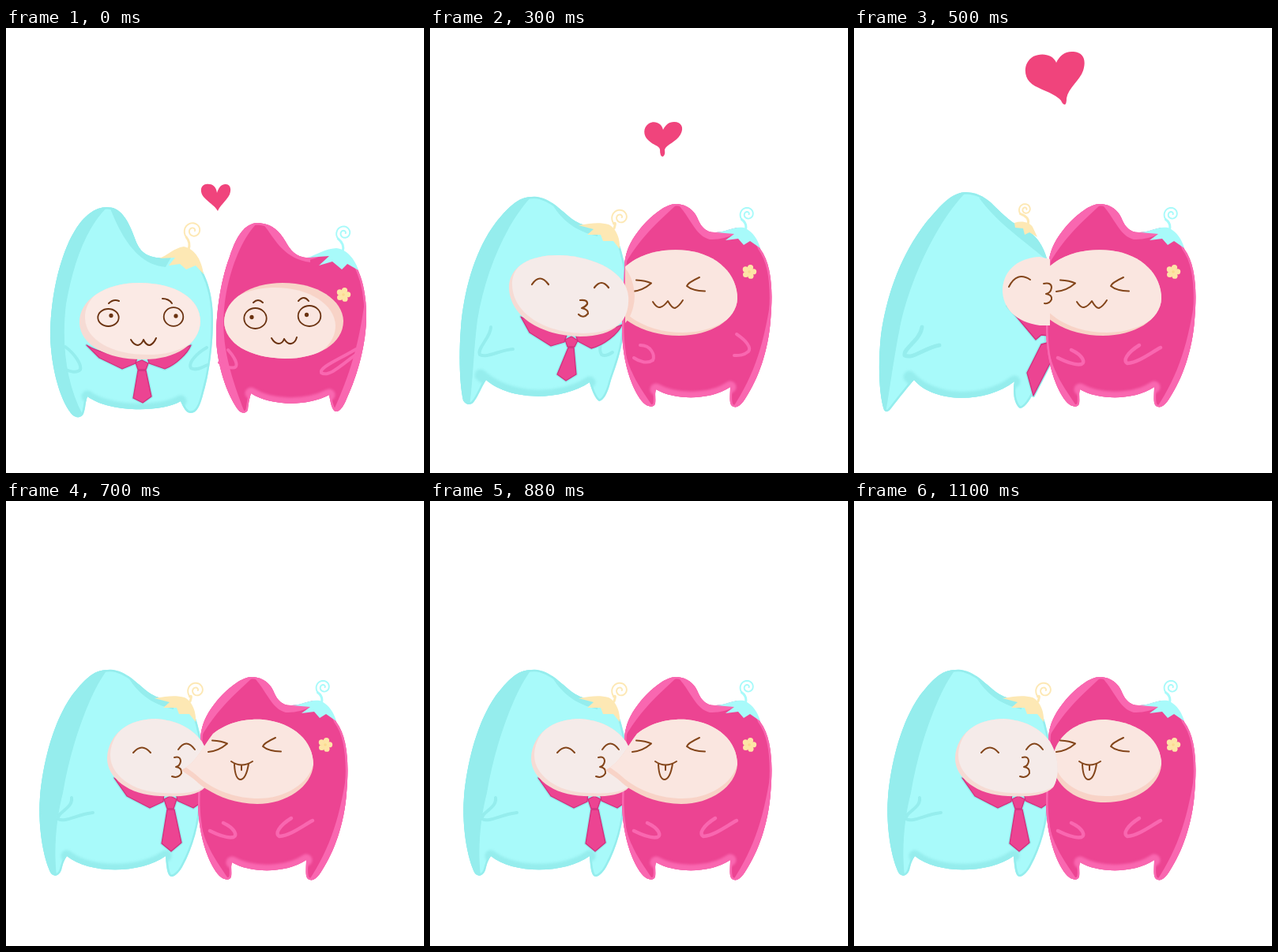
Animation of 529x564 px, one loop 1200 ms. Source, as an HTML page:

```html
<!DOCTYPE html>
<html lang="en">
<head>
<meta charset="utf-8">
<title>Bean kiss</title>
<style>
html, body { margin: 0; width: 100%; height: 100%; overflow: hidden; background: #fff; }
svg { display: block; width: 529px; height: 564px; }
.soft { filter: blur(1.5px); }
</style>
</head>
<body>
<svg id="stage" viewBox="0 0 529 564" fill="none" stroke-linecap="round" stroke-linejoin="round"></svg>
<script>
const AQUA = '#a8fafa', AQUA_DIM = '#95eded', PINK = '#ec4492', PINK_LIT = '#f967b0', PINK_DIM = '#d32e7e';
const CREAM = '#fde8b4', SKIN = '#fae6e0', SKIN_PALE = '#f5ebe9', BLUSH = '#f8d3c7', BLUSH_PALE = '#f6dbd4';
const HEART = '#f0447c', DARK = '#6a3210', BROWN = '#83451a';
const ENDS = [300, 500, 700, 1000, 1100, 1200];

const fill = (d, color) => `<path d="${d}" fill="${color}"/>`;
const line = (d, color, width = 2) => `<path d="${d}" stroke="${color}" stroke-width="${width}"/>`;
const oval = (x, y, rx, ry, color) => `<ellipse cx="${x}" cy="${y}" rx="${rx}" ry="${ry}" fill="${color}"/>`;
const shift = (x, y, art) => `<g transform="translate(${x} ${y})">${art}</g>`;

let clips = 0;
function clipped(d, color, inner) {
  const id = 'clip' + clips++;
  return `<clipPath id="${id}"><path d="${d}"/></clipPath>${fill(d, color)}<g clip-path="url(#${id})">${inner}</g>`;
}

// Side bands, a thin rim all round and a soft wide rim along the belly.
const body = (d, color, edge, bands, belly) =>
  clipped(d, color, fill(bands, edge) + line(d, edge, 5) + `<g class="soft">${line(belly, edge, 15)}</g>`);

// A face is its blush colour with the lit part laid over it, offset.
const face = (d, color, blush, dx, dy) => clipped(d, blush, shift(dx, dy, fill(d, color)));

function curl(x, y, r, stemX, stemY, color) {
  const points = [];
  for (let i = 0; i <= 40; i++) {
    const t = i / 40, a = 2.4 + t * 10.2, k = r * (1 - .84 * t);
    points.push((x + k * Math.cos(a)).toFixed(1) + ',' + (y + k * Math.sin(a)).toFixed(1));
  }
  const neck = `M${stemX},${stemY} Q${stemX + 3},${stemY - 9} ${points[0]}`;
  return line(neck, color, 3) + line('M' + points.join('L'), color, 1.9);
}

function flower(x, y) {
  let art = '';
  for (let i = 0; i < 5; i++) {
    const a = i * Math.PI * .4 - 1.3;
    art += oval(x + 5.6 * Math.cos(a), y + 5.6 * Math.sin(a), 3.6, 3.6, '#fde5a6');
  }
  return art + oval(x, y, 3.6, 3.6, '#fde5a6') + oval(x, y, 1.8, 1.8, '#fbd98e');
}

const eye = (x, y, rx, ry, px, py) =>
  `<ellipse cx="${x}" cy="${y}" rx="${rx}" ry="${ry}" stroke="${DARK}" stroke-width="1.8"/>` + oval(px, py, 2.6, 2.8, DARK);

function tie(...shapes) {
  return line(shapes.join(''), AQUA_DIM, 4) + shapes.map(d =>
    `<path d="${d}" fill="${PINK}" stroke="${PINK_DIM}" stroke-width="1.3"/>`).join('');
}

const stage = document.getElementById('stage');
const layers = [];
function show(poses, art) {
  const g = document.createElementNS('http://www.w3.org/2000/svg', 'g');
  g.innerHTML = art;
  stage.append(g);
  layers.push({ g, poses });
}

// Hearts
show([0], fill('M267,209C266,199 259,197 253,198C246,199 245,208 250,214C256,221 264,225 268,232C270,226 279,219 283,211C286,203 283,197 277,198C271,199 269,203 267,209Z', HEART));
show([1], fill('M295,129C293,120 284,117 277,121C269,126 270,137 276,142C283,149 290,149 291,154Q291,163 294.5,163Q298,162 297,154C300,147 311,145 317,135C322,126 318,119 309,119C302,119 298,123 295,129Z', HEART));
show([2], fill('M256,44C252,33 237,31 227,36C215,43 214,59 222,68C231,78 251,80 262,92Q264,97 267,97Q269,96 269,89C271,76 286,66 290,54C294,41 291,31 278,30C267,29 260,35 256,44Z', HEART));

// Aqua bodies
show([0],
  body('M128,227C108,227 92,245 80,270C64,305 56,350 56,390C57,430 68,470 82,488C87,495 95,495 98,489C101,481 100,475 103,467C130,487 195,488 221,473C225,482 228,488 234,488C242,488 246,478 250,462C258,435 262,400 262,370C262,345 257,325 250,311C242,290 230,278 215,285C208,290 200,292 190,291C172,288 167,278 162,264C155,245 146,227 128,227Z',
    AQUA, AQUA_DIM, 'M128,227C100,255 85,300 76,350C70,400 76,450 97,490L40,500V220ZM132,229C145,262 165,300 202,303L215,280 190,270 150,225Z',
    'M103,467C130,487 195,488 221,473') +
  line('M75,404C86,412 96,426 94,433C88,440 75,432 62,429M254,405C242,412 230,424 234,431C240,435 249,430 255,427', AQUA_DIM, 4) +
  curl(237, 257, 12, 231, 281, CREAM) +
  fill('M194,292C205,288 212,279 225,277C240,280 248,296 250,312L240,301 228,306 220,299 206,301 214,291Z', CREAM));

const sprout = curl(241, 240, 11.5, 233, 254, CREAM) +
  fill('M188,250C205,247 215,246 226,249C236,254 241,268 240,280L232,270 219,270 216,262 199,262 207,255Z', CREAM);
const shoulder = 'C251,340 250,310 244,290C240,270 230,250 215,248C205,248 200,252 190,248C172,240 160,220 140,215Q134,213 128,214Z';
const valley = 'M150,213C160,238 180,257 212,264L215,240 160,210Z';
show([1],
  body('M128,214C112,214 98,228 83,247C58,280 43,330 39,380C36,420 38,455 42,472C46,479 53,478 56,473C62,465 65,455 71,446C100,472 165,474 202,449C205,460 209,470 214,473C220,472 225,462 228,450C236,425 245,405 246,370' + shoulder,
    AQUA, AQUA_DIM, 'M128,214C95,250 70,310 60,370C55,410 55,440 50,480H20V214Z' + valley,
    'M64,440C100,472 165,474 202,449') +
  line('M77,379C77,392 59,406 63,414C72,419 88,408 105,407M229,376C218,390 212,406 217,414Q222,417 231,411', AQUA_DIM, 4) + sprout);
show([2],
  body('M142,208C124,208 110,224 90,248C58,290 41,340 34,390C30,430 32,465 38,484C41,488 44,486 47,482C58,468 68,455 76,446C100,475 165,477 203,448C200,465 204,478 210,482C216,482 224,470 227,462C235,445 240,425 243,400L246,300C242,280 232,262 215,254C205,250 195,243 180,228C165,212 155,209 142,208Z',
    AQUA, AQUA_DIM, 'M142,208C105,245 70,320 58,380C50,420 45,460 40,488L20,480V208ZM158,215C180,245 205,262 245,295V280L190,225Z',
    'M70,442C100,475 165,477 203,448') +
  line('M86,379C84,396 62,406 64,415C75,420 88,406 108,402', AQUA_DIM, 5) +
  curl(217, 230, 8.5, 220, 249, CREAM) +
  fill('M203,247C212,244 222,246 226,252L232,265 222,259 216,262 214,254 204,253Z', CREAM));
show([3, 4, 5],
  body('M128,214C110,214 98,228 83,247C60,280 47,330 43,375C40,415 48,455 57,472C62,477 67,475 70,468C72,460 73,456 77,450C105,473 170,473 202,450C203,460 203,470 207,475C212,479 220,470 224,462C236,440 245,410 247,375' + shoulder,
    AQUA, AQUA_DIM, 'M128,214C105,245 82,310 72,370C64,400 60,440 64,475H30V214Z' + valley,
    'M77,450C105,473 170,473 202,450') +
  line('M83,376C85,390 63,395 66,403C75,408 90,397 110,395', AQUA_DIM, 4) + sprout);

// Collars and ties, tucked under the faces
show([0], tie(
  'M102,402C115,410 140,417 166,417L164,425 147,432 118,418Z',
  'M179,417C205,415 225,406 234,402C230,412 215,427 201,432L181,425Z',
  'M167,434H177L184,467 173,475 161,469Z', 'M164,424L172,421 180,425 177,433H167Z'));
show([1], tie(
  'M115,366C130,374 155,383 174,386L170,398 153,403 126,386Z',
  'M184,388C215,386 235,380 243,376C238,388 220,402 204,406L187,397Z',
  'M175,405H182L185,439 172,447 161,439Z', 'M171,395L179,391 187,396 183,404H174Z'));
show([2], tie(
  'M194,352C205,362 220,370 247,372L246,390 237,389 230,395Z', 'M237,401L248,398V425L227,466 219,437Z'));
show([3, 4, 5], tie(
  'M137,351C150,360 175,368 200,368L199,381 182,389 153,374Z',
  'M215,369C230,369 242,366 248,365L247,382 237,389 217,380Z',
  'M204,391H213L222,433 209,444 197,434Z', 'M200,378L208,374 216,378 212,390H204Z'));

// Pink bodies
show([0],
  body('M318,247C300,248 290,268 283,290C270,325 266,365 266,395C268,435 283,470 294,484C298,489 304,489 306,484C307,475 308,470 310,463C335,479 380,480 409,465C411,475 412,484 417,486C422,487 427,480 431,470C445,440 456,400 456,365C456,340 452,322 446,308C440,292 430,280 415,280C405,281 398,288 385,291C368,292 360,282 354,271C346,258 338,248 318,247Z',
    PINK, PINK_LIT, 'M318,247C300,265 285,300 278,340C270,390 280,430 302,487L260,490V247ZM324,247C338,262 348,292 385,297V280L340,245ZM456,330C448,400 435,440 414,486H456Z',
    'M310,463C335,479 380,480 409,465') +
  line('M281,408C290,418 294,427 290,430C283,432 275,428 270,424M443,407C420,421 396,430 399,437C408,443 424,428 445,412', PINK_LIT, 4) +
  curl(428, 260, 10.5, 426, 283, AQUA) +
  fill('M381,291C395,287 402,280 418,279C434,281 443,297 446,307L432,299 425,306 413,296 396,301 409,289Z', AQUA) +
  flower(427, 338));
show([1, 2, 3, 4, 5],
  body('M313,223C300,222 283,235 268,252C253,270 246,285 246,305C245,330 243,360 243,385C244,425 256,460 270,475C276,481 284,481 285,476C286,468 284,465 286,458C310,472 355,472 380,455C380,465 378,475 382,479C388,483 394,478 400,468C415,445 428,410 431,370C434,335 433,300 418,280C412,265 403,254 390,253C382,254 372,259 362,259C348,260 342,250 338,240C334,231 325,224 313,223Z',
    PINK, PINK_LIT, 'M313,223C292,243 270,260 246,300L240,220ZM313,223C330,240 335,263 354,268Q370,269 388,260L370,240 330,220ZM433,330C424,400 410,440 384,480H440ZM243,395C252,440 266,455 282,480L240,482Z',
    'M286,458C310,472 355,472 380,455') +
  curl(402, 236, 10, 399, 257, AQUA) +
  fill('M362,259C375,258 385,251 397,253C408,257 415,268 418,279L405,270 397,275 390,267 374,269 385,261Z', AQUA) +
  flower(404, 309));
show([1], line('M266,402C280,402 285,415 282,421C275,426 265,423 258,418M388,388C400,396 407,405 403,410C397,415 392,415 385,415', PINK_LIT, 4));
show([2, 3, 4, 5], line('M275,408C290,415 293,424 288,426C280,428 268,423 258,418M361,402C345,412 340,422 346,425C360,424 375,412 388,405', PINK_LIT, 4.5));

// Open-eyed faces
show([0],
  face('M93,374C92,345 125,323 168,323C215,323 246,343 246,372C245,402 212,421 172,420C128,420 94,402 93,374Z', '#fbeae5', BLUSH_PALE, 7, -6) +
  eye(129.5, 367, 13.2, 11, 133, 364.5) + eye(212, 366, 12.3, 11.8, 215, 365) +
  line('M130,349Q136,343 143,346M198,343Q206,343 210,349M158,395Q162,402 167,402Q172,401 174,395Q177,402 182,402Q187,400 190,393', DARK) +
  face('M276,372C277,343 310,323 350,323C395,323 426,345 427,371C427,400 395,419 353,419C308,418 277,400 276,372Z', SKIN, BLUSH, -10, 6) +
  eye(315.5, 368, 14.2, 13, 311, 366.5) + eye(384, 365, 14.3, 13, 380.5, 363.5) +
  line('M313,348Q319,342 325,348M370,346Q377,338 383,346M336,393Q340,400 345,400Q350,400 352,394Q356,401 361,400Q366,399 368,392', DARK));

const squint = line('M261,319.5Q273,320 280,323.5Q269,333 256,334M341,316Q326,323 325,327Q332,333 348,333.5', BROWN);
const tongueOut = shift(0, -16, squint) +
  line('M285,330Q298,339 312,330M289,334Q290,353 297,353Q304,352 307,333M298,335V341', BROWN);
const calm = face('M240,309C262,285 295,279 325,282C365,287 389,313 389,343C388,370 355,390 315,390C285,390 258,380 240,363Z', SKIN, BLUSH, 5, -4) +
  squint + line('M282,347Q287,355 291,354Q296,353 301,346Q306,355 310,355Q315,353 320,345', BROWN);
const kisser = face('M128,325C130,295 155,276 190,276C215,278 235,287 248,305C258,322 262,345 252,363C240,375 215,375 195,374C155,373 127,350 128,325Z', SKIN_PALE, BLUSH_PALE, 4, -4) +
  line('M161,319Q172,306 183,319M218,315Q228,300 239,315M213,325Q221,323 221,330Q220,336 215,337Q223,338 222,345Q218,352 210,349', BROWN);
const cheek = 'C285,277 310,276 325,277C365,281 389,305 389,334C387,362 355,384 318,384';

show([1, 2],
  `<clipPath id="near"><path d="M247,260H400V400H247Z"/></clipPath><g clip-path="url(#near)">${calm}</g>`);
show([1],
  fill('M247,304Q258,318 259,340Q258,362 247,374Z', BLUSH) +
  face('M100,325C103,300 130,287 165,288C210,290 248,310 251,340C253,370 235,391 190,391C140,390 98,365 100,325Z', SKIN_PALE, BLUSH_PALE, 4, -4) +
  line('M129,325Q139,310 150,325M208,329Q217,317 226,329M190,345Q200,344 199,350Q196,354 192,355Q201,357 200,362Q194,369 188,363', BROWN, 2.2));
show([2],
  fill('M188,330C190,305 210,291 235,290L248,293V377H235C205,373 187,355 188,330Z', SKIN) +
  line('M196,328Q206,308 223,319M240,324Q250,322 250,329Q249,336 243,337Q251,338 250,344Q247,350 241,349', BROWN));
show([3, 4], kisser);
show([3], face('M222,341C240,333 250,310 262,295' + cheek + 'C285,384 258,370 244,358C236,350 228,346 222,341Z', SKIN, BLUSH, 1, -7));
show([4], face('M238,348C236,335 250,310 262,295' + cheek + 'C270,384 240,368 238,348Z', SKIN, BLUSH, 1, -7));
show([5], face('M251,330C253,300 280,277 318,277C365,281 389,305 389,334C387,362 355,382 318,382C280,382 252,360 251,330Z', SKIN, BLUSH, 1, -8));
show([3, 4, 5], tongueOut);
show([5], kisser);

function render(ms) {
  const time = ms % 1200;
  const pose = ENDS.findIndex(end => time < end);
  for (const { g, poses } of layers) g.style.display = poses.includes(pose) ? '' : 'none';
}

const start = performance.now();
function tick() {
  render(performance.now() - start);
  requestAnimationFrame(tick);
}
tick();
</script>
</body>
</html>
```
